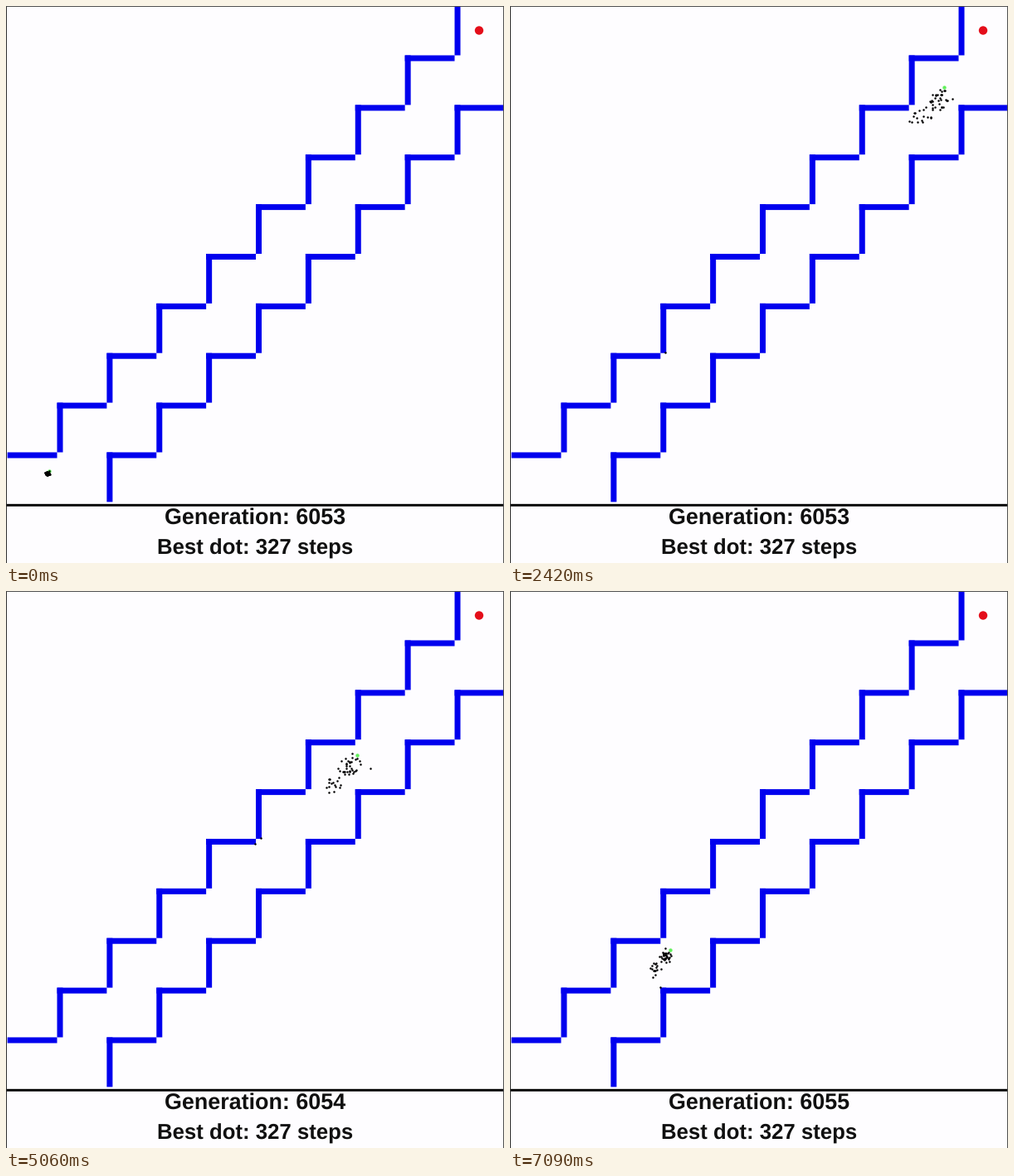
A matplotlib script that plays this animation: 600 by 672 pixels, repeating every 7.12 s.

```python
import numpy as np
import matplotlib.pyplot as plt
from matplotlib.animation import FuncAnimation
from matplotlib.patches import Circle, Rectangle

W, H, DPI = 600, 672, 100
PX = 72 / DPI                       # points per pixel
LOOP, TICK = 7120, 20               # ms
STEP, WALL = 59.87, 7               # stair pitch and wall thickness
BLUE, BLACK = "#0000ee", "#000000"

STARTS = [-158, 3030, 6236]         # ms at which each generation sets off
FIRST_GEN = 6053
CRASHES = [[(187, 418)],
           [(300, 305), (307, 298), (485, 180)],
           [(181, 478)]]

# Best dot's route: age in ms, x, y
ROUTE = np.array([
    (0, 30, 570), (158, 52, 561), (300, 87, 536), (854, 195, 431),
    (1090, 241, 382), (1798, 378, 244), (2030, 423, 198),
    (2674, 541, 80), (2850, 565, 38), (2872, 567, 33)])


def route(age):
    ages, xs, ys = ROUTE.T
    return np.column_stack([np.interp(age, ages, xs), np.interp(age, ages, ys)])


class Swarm:
    """Dots that trail the best one and drift apart with age."""

    def __init__(self, seed, crashes, n=48):
        rng = np.random.default_rng(seed)
        i = np.arange(n)
        lag = np.where(i % 10 < 3, rng.normal(0.68, 0.12, n),
                       rng.normal(0.26, 0.12, n))
        self.lag = np.clip(lag, 0.04, 0.95)
        self.side = np.clip(rng.normal(2.8, 4, n), -6, 10)
        self.phase = rng.uniform(0, 2 * np.pi, n)
        self.kin = i % 8            # dots of one family start out together
        self.crash = np.array(crashes, float)
        # a stray dies when the best dot is level with its crash point
        along = ROUTE[:, 1] - ROUTE[:, 2]
        level = self.crash[:, 0] - self.crash[:, 1]
        self.death = np.interp(level, along, ROUTE[:, 0])
        self.miss = self.crash - route(self.death)

    def at(self, age):
        own = min(age / 800, 1)
        lag, side = (v[self.kin] * (1 - own) + v * own
                     for v in (self.lag, self.side))
        side = side + 0.8 * own * np.sin(age / 170 + self.phase)
        pos = route(np.maximum(age - 5.2 * lag * np.sqrt(age), 0))
        fade = np.clip((574 - pos[:, 0]) / 30, 0.2, 1)
        pos += (side * fade * np.sqrt(age / 2000))[:, None]
        life = np.minimum(age, self.death)
        strays = route(life) + self.miss * ((life / self.death) ** 3)[:, None]
        return np.vstack([pos, strays])


SWARMS = [Swarm(40 + k, c) for k, c in enumerate(CRASHES)]

plt.rcParams["text.hinting"] = "none"
fig = plt.figure(figsize=(W / DPI, H / DPI), dpi=DPI, facecolor="#fefdff")
ax = fig.add_axes([0, 0, 1, 1])
ax.set(xlim=(0, W), ylim=(H, 0))
ax.axis("off")


def box(x0, y0, x1, y1, color=BLUE):
    ax.add_patch(Rectangle((x0, y0), x1 - x0, y1 - y0, fc=color, lw=0,
                           snap=False))


def dots(diameter, color, z):
    return ax.scatter([], [], s=(diameter * PX) ** 2, c=color, lw=0, zorder=z)


def label(y, size, text=""):
    return ax.text(W / 2, y, text, size=size * PX, family="Liberation Sans",
                   weight="bold", color="#101010", ha="center", va="baseline")


for k in range(9):
    x, y = 540.5 - STEP * k, 59.5 + STEP * k
    box(x, y - STEP, x + WALL, y)
    box(x - STEP, y, x, y + WALL)
    if k < 8:
        low = y + STEP
        box(x, low, x + STEP, low + WALL)
        box(x, low, x + WALL, low + STEP)

box(0, 600.8, W, 603.7, BLACK)
box(0, 0, 1, H, "#303030")
box(W - 1, 0, W, H, "#505050")
box(0, 0, W, 1, "#505050")
ax.add_patch(Circle((570, 29.5), 5.2, fc="#e40d1a", lw=0, zorder=2))

best = dots(4.4, "#62f05c", 3)
crowd = dots(2.5, BLACK, 4)
title = label(625, 26.9)
label(661.5, 25.7, "Best dot: 327 steps")


def draw(i):
    t = i * TICK
    gen = np.searchsorted(STARTS, t, side="right") - 1
    age = t - STARTS[gen]
    best.set_offsets(route([age]))
    crowd.set_offsets(SWARMS[gen].at(age))
    title.set_text(f"Generation: {FIRST_GEN + gen}")
    return best, crowd, title


anim = FuncAnimation(fig, draw, frames=LOOP // TICK, interval=TICK,
                     repeat=True, repeat_delay=0)
plt.show()
```
